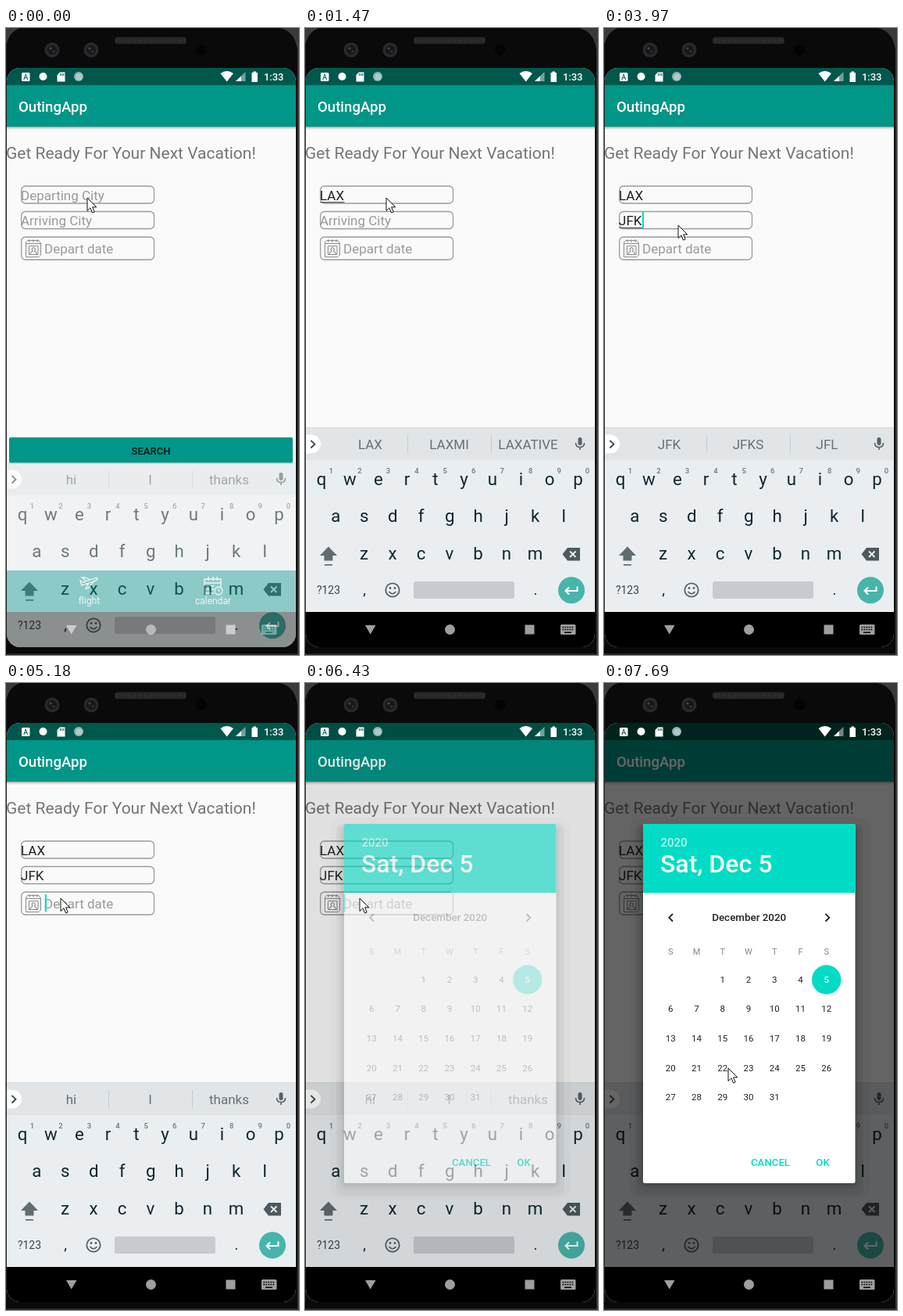
An HTML page for the animation above (7990 ms loop, 375x801 px).

```html
<!DOCTYPE html>
<html lang="en">
<head>
<meta charset="utf-8">
<title>Trip search</title>
<style>
html, body { margin: 0; width: 100%; height: 100%; overflow: hidden; background: #0a0a0a; }
svg { display: block; width: 375px; height: 801px; font-family: Roboto, "Open Sans", sans-serif; }
text { white-space: pre; }
.mid { text-anchor: middle; }
.med { font-weight: 500; }
</style>
</head>
<body>
<svg id="stage" viewBox="0 0 375 801" xmlns="http://www.w3.org/2000/svg"></svg>
<script>
const LOOP = 7990;
const TEAL = '#009688', ACCENT = '#00dcc5';

const text = (x, y, size, fill, str, cls = '', extra = '') =>
  `<text x="${x}" y="${y}" font-size="${size}" fill="${fill}" class="${cls}" ${extra}>${str}</text>`;
const rect = (x, y, w, h, fill, extra = '') =>
  `<rect x="${x}" y="${y}" width="${w}" height="${h}" fill="${fill}" ${extra}/>`;
const circle = (x, y, r, fill, extra = '') =>
  `<circle cx="${x}" cy="${y}" r="${r}" fill="${fill}" ${extra}/>`;
const path = (d, fill, extra = '') => `<path d="${d}" fill="${fill}" ${extra}/>`;
const line = (d, color, width, extra = '') =>
  path(d, 'none', `stroke="${color}" stroke-width="${width}" ${extra}`);

function phone() {
  let grille = '';
  for (let x = 141; x < 230; x += 3) grille += rect(x, 13, 1, 6, '#353535');
  const camera = x => circle(x, 28, 9.5, '#29292b') + circle(x, 28, 6, '#17181c') +
    circle(x - 2, 26, 1.6, '#46474d') + circle(x + 2, 30, 1.3, '#3b3c44');
  return rect(0, 0, 375, 801, '#0a0a0a') +
    path('M0 0H18Q3 5 0 24Z', '#3b3b3d') + path('M375 0H350Q370 4 373 28V801H375Z', '#3a3a3c') +
    line('M0 24V790', '#333', 1) + line('M0 800H375', '#444', 1) +
    rect(139, 11.5, 92, 9, '#242424', 'rx="4"') + grille +
    camera(59) + camera(109) + circle(250, 28, 7, '#030305');
}

function field(id, y, h, x, hint) {
  return rect(19.7, y, 169.8, h, 'none', 'rx="5" stroke="#9b9b9b" stroke-width="1.3"') +
    text(x, y + h / 2 + 6.7, 17, '#9a9a9a', hint, '', `id="${id}"`) +
    rect(x + 0.5, y + h / 2 + 9.2, 0, 1, '#333', `id="${id}Line"`);
}

function app() {
  const dateIcon = line('M27.5 271.5H42L44.5 275V290L42 292.5H25.5V274Z' +
      'M25.5 275.5H44.5M29.5 278.5H41V289.5H29.5ZM30 270V274M35 270V274M40 270V274', '#8b8b8b', 1) +
    line('M31 289Q31 286 34 285.5Q32 281 35.2 280.5Q38.5 281 36.5 285.5Q39.5 286 39.5 289', '#777', 1);
  const plane = line('M95 706L99 708L113 703Q117 702 117 704Q116 706 112 707L97 712Z' +
    'M102 706L97 702H101L108 705M106 709L102 716H105L112 707', '#fff', 1.3);
  const calendar = line('M254 704H275V714M254 704V722H266M254 709H275M259 701V706M265 701V706M270 701V706' +
    'M257 713H260M263 713H266M257 717H260M263 717H266', '#fff', 1.4) +
    circle(272, 719, 5, 'none', 'stroke="#fff" stroke-width="1.3"') + line('M272 716V719H274', '#fff', 1);
  return rect(1, 51, 370, 740, '#fafafa') +
    rect(1, 126, 370, 1.5, '#000', 'opacity=".3"') + rect(1, 127.5, 370, 2, '#000', 'opacity=".09"') +
    rect(1, 51, 370, 22, '#00574b') + rect(1, 73, 370, 53, TEAL) +
    text(16, 107, 18.6, '#fff', 'OutingApp', 'med') +
    text(0, 167, 21, '#757575', 'Get Ready For Your Next Vacation!') +
    field('from', 202, 22, 19, 'Departing City') +
    field('to', 234.5, 22, 19, 'Arriving City') +
    field('date', 267, 29, 49, 'Depart date') + dateIcon +
    rect(0, 0, 2, 22.5, ACCENT, 'id="caret"') +
    rect(4, 524, 363, 33, '#000', 'rx="2" opacity=".22"') + rect(4, 523, 363, 33, TEAL, 'rx="2"') +
    text(185.5, 545, 13.1, '#111', 'SEARCH', 'mid med') +
    rect(1, 693, 370, 53, TEAL) + plane + calendar +
    text(106.5, 736, 12.3, '#fff', 'flight', 'mid') + text(265, 736, 12, '#fff', 'calendar', 'mid') +
    rect(1, 746, 370, 46, '#000');
}

const navIcons = () => path('M77 763H90.5L83.7 774.5Z', '#9e9e9e') + circle(185.5, 768.5, 6.5, '#9e9e9e') +
  rect(281.5, 762.5, 12, 12, '#9e9e9e') + rect(327, 762, 19.5, 13, '#9e9e9e', 'rx="1.5"') +
  line('M329.5 765.5H344M329.5 768.5H344', '#000', 1.6, 'stroke-dasharray="1.7 1.3"') +
  line('M332 772.2H341', '#000', 1.5);

function keyboard() {
  const ink = '#10262e', soft = '#566267';
  const row = (keys, x0, y) => [...keys].map((k, i) =>
    text(x0 + i * 36.5, y, 22.3, ink, k, 'mid')).join('');
  const digits = [...'1234567890'].map((d, i) =>
    text(33.5 + i * 36.45, 568.5, 9.5, '#6b777c', d, 'mid med')).join('');
  const slots = [83.5, 184.5, 285.5].map((x, i) =>
    text(x, 538, 17, '#657075', '', 'mid', `id="slot${i}"`)).join('');
  return rect(1, 510, 370, 42, '#e1e5e8') + rect(1, 552, 370, 194, '#eaeef1') +
    rect(1, 510, 370, 1, '#d8dcdf') +
    path('M1 519.5H8A12 12 0 0 1 8 543.5H1Z', '#fff') + line('M7.5 527L12.5 531.7L7.5 536.5', '#37474f', 1.8) +
    line('M131.5 520V543M238.5 520V543', '#c5cbcf', 1) + slots +
    rect(349.5, 523, 5, 10, soft, 'rx="2.5"') +
    line('M346.5 530Q346.5 535.5 352 535.5Q357.5 535.5 357.5 530M352 535.5V539', soft, 1.6) +
    row('qwertyuiop', 21, 584) + digits + row('asdfghjkl', 39.2, 631) + row('zxcvbnm', 75.5, 678.5) +
    path('M30 662.5L41 674H35.5V680.5H24.5V674H19Z', '#616c71') + rect(25, 685, 10, 1.7, '#616c71') +
    path('M336 664H352V680.5H336L329.5 672.2Z', '#4d595e') +
    line('M339 668.5L346.5 676M346.5 668.5L339 676', '#eaeef1', 1.8) +
    text(30, 723, 14, '#37474f', '?123', 'mid') + text(76, 724, 19, ink, ',', 'mid') + text(295, 724, 19, ink, '.', 'mid') +
    circle(112, 718, 8.7, 'none', `stroke="${soft}" stroke-width="1.8"`) +
    circle(109, 715.5, 1.4, soft) + circle(115, 715.5, 1.4, soft) + line('M107.5 720Q112 725.5 116.5 720', soft, 1.7) +
    rect(139, 707, 129, 22, '#c7cbcf', 'rx="2.5"') +
    circle(341, 718.3, 17, '#47b5aa') +
    line('M348.5 713.5V719H334M338 714.5L333.5 719L338 723.5', '#fff', 2);
}

const statusIcons = () => rect(20, 57, 10.5, 11, '#fff', 'rx="1.5"') +
  text(25.2, 66, 9, '#00574b', 'A', 'mid med') + circle(47.5, 62, 5, '#fff') +
  path('M69 56.5H75.5V68.5H65.5V60Z', '#fff') + line('M69.5 58V61M71.7 58V61M73.8 58V61', '#00574b', 1) +
  circle(93, 62, 6, '#8fb5b0') + circle(93.5, 62.5, 4, '#b2cbc8') +
  path('M274.5 58Q282.7 52 291 58L282.7 68.5Z', '#fff') +
  path('M306.5 56V68H294Z', '#fff', 'opacity=".45"') + path('M301 61.5V68H294Z', '#fff') +
  path('M316.5 55.5H320V57H322V69H314.5V57H316.5Z', '#fff') +
  text(342.7, 67, 13, '#fff', '1:33', 'mid med');

function dialog() {
  const colX = i => 85.2 + i * 33.25;
  const week = [...'SMTWTFS'].map((d, i) => text(colX(i), 347, 11, '#858585', d, 'mid')).join('');
  let days = '';
  for (let d = 1; d <= 31; d++) {
    const cell = d + 1;
    days += text(colX(cell % 7), Math.round(382.8 + Math.floor(cell / 7) * 37.6), 11.5,
      d === 5 ? '#fff' : '#222', d, d === 5 ? 'mid med' : 'mid');
  }
  return rect(32, 172, 308, 486, '#000', 'rx="14" opacity=".03"') +
    rect(40, 180, 292, 475, '#000', 'rx="10" opacity=".06"') +
    rect(47, 184, 277, 459, '#000', 'rx="4" opacity=".2" filter="url(#soft)"') +
    rect(50, 180, 271.5, 459, '#fff', 'rx="2"') + path('M50 268V182Q50 180 52 180H319.5Q321.5 180 321.5 182V268Z', ACCENT) +
    text(72.5, 209, 15, '#fff', '2020', 'med', 'opacity=".7"') +
    text(72, 242, 32, '#fff', 'Sat, Dec 5', 'med') +
    `<g id="month">` +
    line('M88 295L83.2 299.7L88 304.5M283.5 295L288.3 299.7L283.5 304.5', '#222', 1.8) +
    text(185.7, 304.3, 13.4, '#222', 'December 2020', 'mid med') + week +
    circle(284.7, 379, 18.7, ACCENT) + days + '</g>' +
    text(213, 617, 13.2, ACCENT, 'CANCEL', 'mid med') + text(280, 617, 13.2, ACCENT, 'OK', 'mid med');
}

const stage = document.getElementById('stage');
stage.innerHTML = `<defs>
  <clipPath id="screen"><rect x="1" y="51" width="370" height="740" rx="17"/></clipPath>
  <filter id="soft" x="-10%" y="-10%" width="120%" height="120%"><feGaussianBlur stdDeviation="3"/></filter>
</defs>` + phone() +
  `<g clip-path="url(#screen)">${app()}${navIcons()}<g id="keyboard">${keyboard()}</g>` +
  rect(1, 51, 370, 695, '#000', 'id="dim"') + `${statusIcons()}<g id="dialog">${dialog()}</g></g>` +
  `<g id="pointer">${path('M0 0V16.5L3.9 12.8L6.6 19L9.2 17.9L6.6 11.8H11.8Z', '#fff',
    'stroke="#111" stroke-width="1" stroke-linejoin="round"')}</g>`;

const el = {};
stage.querySelectorAll('[id]').forEach(n => el[n.id] = n);

// Each entry changes part of the scene and holds until the next one.
const idle = ['hi', 'I', 'thanks'];
const steps = [
  [0, { from: '', to: '', active: 'from', composing: false, caret: false, words: idle,
        slide: 45, kb: .6, dim: 0, dialog: 0, month: 0, pointer: [104, 217] }],
  [120, { slide: 8, kb: .93 }],
  [260, { slide: 0, kb: 1, caret: true }],
  [400, { from: 'L', composing: true, words: ['L', 'LOL', 'LA'] }],
  [540, { from: 'LA', words: ['LA', 'LAST', 'LATE'] }],
  [1070, { from: 'LAX', words: ['LAX', 'LAXMI', 'LAXATIVE'] }],
  [1470, { caret: false }],
  [1750, { caret: true, pointer: [103, 223] }],
  [1887, { pointer: [99, 238] }],
  [2025, { pointer: [96, 249] }],
  [2162, { pointer: [95, 252], active: 'to', composing: false, caret: false }],
  [2300, { caret: true, words: idle }],
  [2750, { caret: false }],
  [3120, { caret: true }],
  [3325, { to: 'J', composing: true, words: ['J', 'JUST', 'JK'] }],
  [3530, { to: 'JF', words: ['JF', 'JFK', 'JFF'] }],
  [3970, { to: 'JFK', words: ['JFK', 'JFKS', 'JFL'] }],
  [4370, { caret: false }],
  [4505, { pointer: [92, 257] }],
  [4640, { pointer: [84, 265] }],
  [4775, { pointer: [75, 272], caret: true }],
  [4910, { pointer: [70, 275] }],
  [5045, { active: 'date', composing: false, caret: false, words: idle }],
  [5180, { caret: true }],
  [5600, { caret: false }],
  [5750, { caret: true }],
  [6310, { dim: .02, dialog: .12 }],
  [6430, { dim: .1, dialog: .59, month: .4 }],
  [6550, { dim: .6, dialog: 1, month: 1 }],
  [6960, { pointer: [76, 290] }],
  [7106, { pointer: [108, 352] }],
  [7252, { pointer: [152, 432] }],
  [7398, { pointer: [181, 491] }],
  [7544, { pointer: [170, 497] }],
  [7690, { pointer: [159, 492] }]
];
const hints = { from: 'Departing City', to: 'Arriving City', date: 'Depart date' };
const carets = { from: [19.5, 202], to: [19.5, 234.5], date: [49.8, 270] };

function setText(node, value) {
  if (node.textContent !== value) node.textContent = value;
}

function draw(time) {
  const s = {};
  for (const [at, change] of steps) if (at <= time) Object.assign(s, change);
  for (const id of ['from', 'to']) {
    setText(el[id], s[id] || hints[id]);
    el[id].setAttribute('fill', s[id] ? '#212121' : '#9a9a9a');
    const width = s[id] ? el[id].getComputedTextLength() : 0;
    el[id + 'Line'].setAttribute('width', s.composing && s.active === id ? width : 0);
    if (s.active === id) s.caretShift = width;
  }
  const [x, y] = carets[s.active];
  el.caret.setAttribute('x', x + (s.caretShift || 0));
  el.caret.setAttribute('y', y);
  el.caret.setAttribute('opacity', s.caret ? 1 : 0);
  s.words.forEach((word, i) => setText(el['slot' + i], word));
  el.keyboard.setAttribute('transform', `translate(0 ${s.slide})`);
  el.keyboard.setAttribute('opacity', s.kb);
  for (const id of ['dim', 'dialog', 'month']) el[id].setAttribute('opacity', s[id]);
  el.pointer.setAttribute('transform', `translate(${s.pointer})`);
}

let start;
function tick(now) {
  start ??= now;
  draw((now - start) % LOOP);
  requestAnimationFrame(tick);
}
draw(0);
requestAnimationFrame(tick);
</script>
</body>
</html>
```
